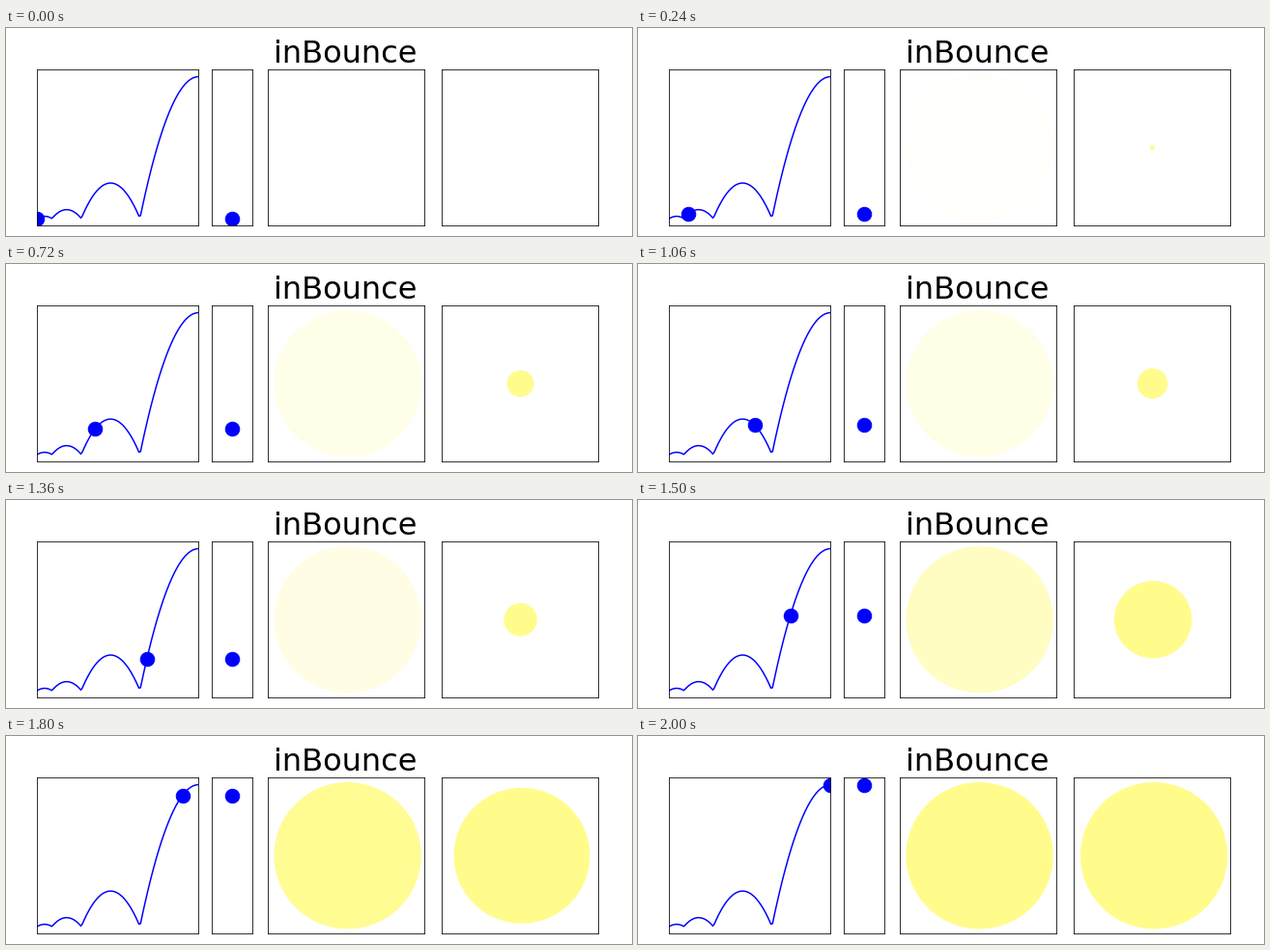
Animation of 648 by 216 pixels, one loop 2.02 s. Source, as a matplotlib script:

```python
import numpy as np
import matplotlib.pyplot as plt
from matplotlib.animation import FuncAnimation
from matplotlib.patches import Circle

FRAMES = 101
BLUE = "#0000ff"
YELLOW = "#fffc8c"
EMBLEM = np.array([0.512, 0.5])  # centre of the emblem in its square panel
RADIUS = 0.47


def out_bounce(t):
    if t < 1 / 2.75:
        return 7.5625 * t ** 2
    if t < 2 / 2.75:
        return 7.5625 * (t - 1.5 / 2.75) ** 2 + 0.75
    if t < 2.5 / 2.75:
        return 7.5625 * (t - 2.25 / 2.75) ** 2 + 0.9375
    return 7.5625 * (t - 2.625 / 2.75) ** 2 + 0.984375


def in_bounce(t):
    return 1 - out_bounce(1 - t)


times = np.linspace(0, 1, FRAMES)
values = np.array([in_bounce(t) for t in times])

plt.rcParams["font.family"] = "DejaVu Sans"
fig, axes = plt.subplots(
    1, 4, figsize=(9, 3), dpi=72,
    gridspec_kw=dict(width_ratios=[4, 1, 4, 4], left=0.05, right=0.95,
                     bottom=0.05, top=0.8, wspace=0.1))
graph, lift, fade, zoom = axes

for ax in axes:
    ax.set(xticks=[], yticks=[], xlim=(0, 1), ylim=(0, 1))
for ax in (graph, lift):
    ax.set_ylim(-0.05, 1.05)
for ax in (fade, zoom):
    ax.set_aspect("equal")

fade.set_title("inBounce", fontsize=32)
graph.plot(times, values, color=BLUE, lw=1.5)


def add_dot(ax):
    return ax.plot([0], [0], "o", color=BLUE, ms=14.5)[0]


def add_emblem(ax):
    return ax.add_patch(Circle(EMBLEM, RADIUS, fc=YELLOW, ec="none"))


graph_dot, lift_dot = add_dot(graph), add_dot(lift)
fade_disc, zoom_disc = add_emblem(fade), add_emblem(zoom)


def update(i):
    t, v = times[i], values[i]
    graph_dot.set_data([t], [v])
    lift_dot.set_data([0.5], [v])
    size = min(max(v, 0), 1)
    fade_disc.set_alpha(size)
    zoom_disc.set_radius(RADIUS * size)
    zoom_disc.set_center(0.5 + (EMBLEM - 0.5) * size)
    zoom_disc.set_visible(size > 0)
    return graph_dot, lift_dot, fade_disc, zoom_disc


anim = FuncAnimation(fig, update, frames=FRAMES, interval=20,
                     repeat=True, repeat_delay=0)
plt.show()
```
